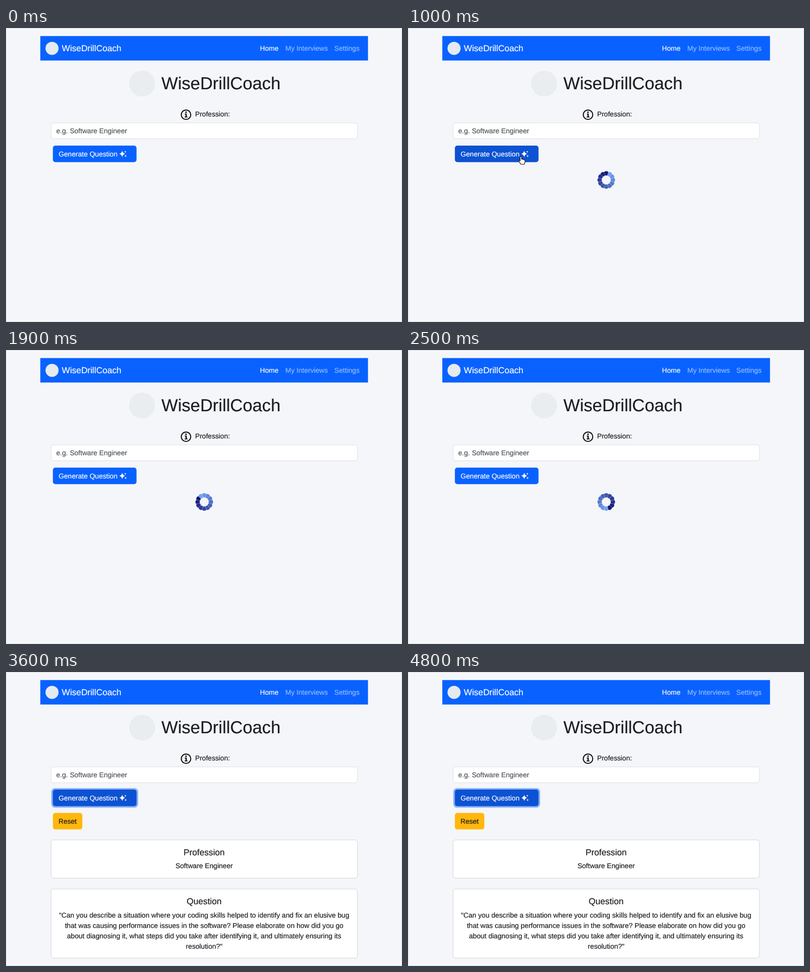
Animation of 800x595 px, one loop 4.9 s. Source, as an HTML page:

```html
<!DOCTYPE html>
<html lang="en">
<head>
<meta charset="utf-8">
<title>Interview practice</title>
<style>
  html, body { margin: 0; width: 100%; height: 100%; overflow: hidden; background: #f5f6fa; }
  svg { display: block; width: 100vw; height: 100vh; }
  text {
    font: 14.08px "Liberation Sans", Arial, sans-serif; white-space: pre; text-rendering: geometricPrecision;
    fill: #1b1d20; stroke: #1b1d20; stroke-width: .2px;
  }
  .mid { text-anchor: middle; }
  .head { font-size: 17.6px; }
  .title { font-size: 35.2px; }
  .white { fill: #fff; stroke: #fff; }
  .dim { fill: #94bbff; stroke: #94bbff; }
  .hint { fill: #4e5256; stroke: #4e5256; }
  .box { fill: #fff; stroke: #cfd2d6; }
</style>
</head>
<body>
<svg viewBox="0 0 800 595">
  <rect x=".5" y=".5" width="799" height="594" fill="#f5f6fa" stroke="#dcdee2"/>

  <rect x="69.3" y="16.3" width="662" height="49.5" fill="#0962ff"/>
  <circle cx="93" cy="41.2" r="13.2" fill="#e4eaef"/>
  <text class="head white" x="112.8" y="47">WiseDrillCoach</text>
  <text class="white" x="513" y="46">Home</text>
  <text class="dim" x="564.2" y="46">My Interviews</text>
  <text class="dim" x="663.3" y="46">Settings</text>

  <circle cx="275" cy="112.5" r="26.3" fill="#eaedf0"/>
  <text class="title" x="314" y="124.3">WiseDrillCoach</text>

  <circle cx="363.7" cy="175.5" r="9.6" fill="none" stroke="#0c0c0e" stroke-width="2"/>
  <circle cx="363.7" cy="170.4" r="1.6" fill="#0c0c0e"/>
  <path d="M361 173.3h4.1v6.2h1.8v1.5h-6.1v-1.5h1.8v-4.7h-1.6z" fill="#0c0c0e"/>
  <text x="382" y="179">Profession:</text>
  <rect x="91" y="192" width="619" height="32" rx="5" fill="#fff" stroke="#dbdee3"/>
  <text class="hint" x="101.5" y="213">e.g. Software Engineer</text>

  <rect id="ring" x="91.5" y="235" width="175.4" height="39.6" rx="7.5" fill="#86b0ff"/>
  <rect id="button" x="94.7" y="238.1" width="169" height="33.4" rx="5"/>
  <text class="white" x="106.3" y="260">Generate Question</text>
  <g id="stars" fill="#fff"></g>

  <g id="result">
    <rect x="94.7" y="285.2" width="59.5" height="33.4" rx="5" fill="#ffb70b"/>
    <text x="106" y="307">Reset</text>
    <rect class="box" x="91" y="339.8" width="619" height="77.4" rx="5"/>
    <text class="head mid" x="400.3" y="371">Profession</text>
    <text class="mid" x="400.3" y="397.3">Software Engineer</text>
    <rect class="box" x="91" y="439" width="619" height="140" rx="5"/>
    <text class="head mid" x="400.3" y="470.2">Question</text>
    <g id="lines"></g>
  </g>

  <g id="spinner" transform="translate(400.5 307.5)"></g>
  <path id="hand" fill="#fff" stroke="#111" stroke-width="1.3" stroke-linejoin="round"
    d="M-1.6 1.4C-1.6-.5 1.6-.5 1.6 1.4V6.2c.6-.9 2.5-.7 2.7.5.8-.6 2.4-.3 2.6.9.9-.5 2.3 0 2.3 1.5v2.5c0 2-1 3-1.4 4.4v1.5H-.2c-.2-1.8-1.8-2.9-2.6-4.3L-4.6 10.2c-.8-1.4.6-2.4 1.8-1.4l1.2 1.4z"/>
</svg>
<script>
const LOOP = 4900, STEP = 100;
const SPIN_ON = 900, DONE = 2700, HAND_ON = 100, HAND_OFF = 1200;
const PETALS = 12, TURN = 1200 / 13 * PETALS;

const $ = id => document.getElementById(id);
function add(parent, tag, attrs, text) {
  const el = document.createElementNS("http://www.w3.org/2000/svg", tag);
  for (const k in attrs) el.setAttribute(k, attrs[k]);
  if (text) el.textContent = text;
  parent.appendChild(el);
  return el;
}
const show = (el, on) => el.setAttribute("visibility", on ? "visible" : "hidden");
const mix = (a, b, p) => a + (b - a) * p;

[[234.8, 254.8, 6.2], [241, 250.6, 2], [241.6, 259, 2.2]].forEach(([x, y, r]) => {
  const k = r * 0.18;
  add($("stars"), "path", {
    transform: `translate(${x} ${y})`,
    d: `M0 ${-r}Q${k} ${-k} ${r} 0Q${k} ${k} 0 ${r}Q${-k} ${k} ${-r} 0Q${-k} ${-k} 0 ${-r}`
  });
});

[
  "\"Can you describe a situation where your coding skills helped to identify and fix an elusive bug",
  "that was causing performance issues in the software? Please elaborate on how did you go",
  "about diagnosing it, what steps did you take after identifying it, and ultimately ensuring its",
  "resolution?\""
].forEach((s, i) => add($("lines"), "text", { class: "mid", x: 400.3, y: 496.8 + i * 20.9 }, s));

const petals = Array.from({ length: PETALS }, (_, i) => add($("spinner"), "path", {
  transform: `rotate(${i * 360 / PETALS})`,
  d: "M-2.3-9.2L-4.1-15.4Q-3.6-17.8 0-17.8T4.1-15.4L2.3-9.2Q0-8.6-2.3-9.2Z"
}));

function spin(t) {
  const head = Math.floor((t - 1300) / TURN * PETALS + 4.05) + 2 * PETALS;
  petals.forEach((el, i) => {
    const p = ((head - i) % PETALS) / (PETALS - 1);
    el.setAttribute("fill", `rgb(${mix(18, 116, p)},${mix(22, 162, p)},${mix(118, 242, p)})`);
  });
}

function moveHand(t) {
  const p = Math.min(1, (t - HAND_ON) / 500), ease = 1 - (1 - p) * (1 - p);
  const up = Math.max(0, Math.min(1, (t - 600) / 200));
  const x = mix(290, 232, ease) - 4 * up;
  const y = mix(464, 269, ease) - 9 * up;
  $("hand").setAttribute("transform", `translate(${x} ${y}) scale(.9)`);
}

function draw(time) {
  const t = Math.floor(time % LOOP / STEP) * STEP;
  const done = t >= DONE, hover = t >= 700 && t < HAND_OFF;
  show($("result"), done);
  show($("ring"), done);
  show($("spinner"), t >= SPIN_ON && !done);
  show($("hand"), t >= HAND_ON && t < HAND_OFF);
  $("button").setAttribute("fill", done || hover ? "#0c52d2" : "#0962ff");
  spin(t);
  moveHand(t);
}

let start;
function tick(now) {
  if (start === undefined) start = now;
  draw(now - start);
  requestAnimationFrame(tick);
}
draw(0);
requestAnimationFrame(tick);
</script>
</body>
</html>
```
